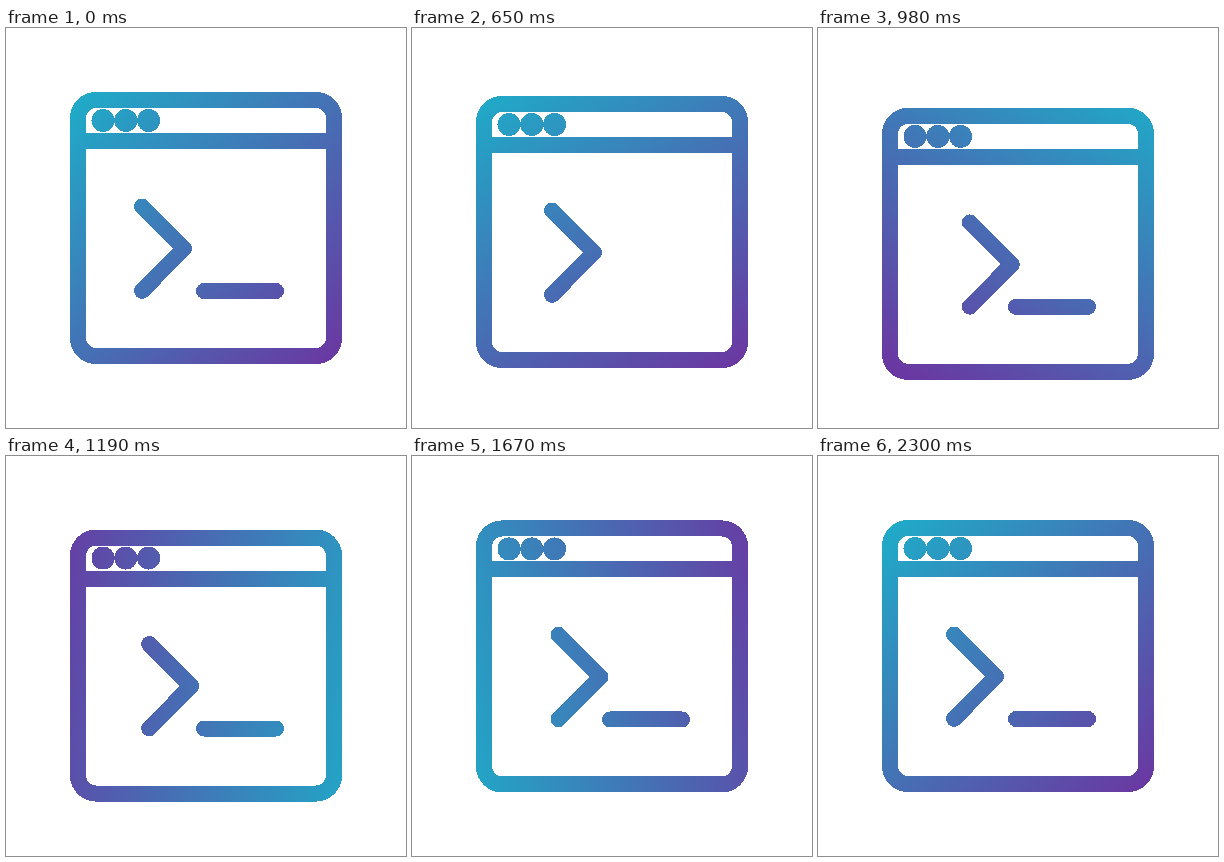
These frames come from a looping animation (400x400 px, 2.36 s). An HTML page:

```html
<!DOCTYPE html>
<html lang="en">
<head>
<meta charset="utf-8">
<title>Terminal window</title>
<style>
  html, body { margin: 0; width: 100%; height: 100%; overflow: hidden; background: #fff; }
  svg { display: block; width: 100vw; height: 100vh; }
  .ink { fill: none; stroke: #fff; stroke-width: 16; stroke-linecap: round; stroke-linejoin: round; shape-rendering: crispEdges; }
  .dots { fill: #fff; stroke: none; }
</style>
</head>
<body>
<svg viewBox="0 0 400 400">
  <defs>
    <linearGradient id="tint" gradientUnits="userSpaceOnUse" x1="16" y1="200" x2="384" y2="200">
      <stop offset="0" stop-color="#1fabc8"/>
      <stop offset="1" stop-color="#6a38a2"/>
    </linearGradient>
    <mask id="icon" maskUnits="userSpaceOnUse" x="0" y="0" width="400" height="400">
      <g id="win" class="ink">
        <rect x="72" y="72" width="256" height="256" rx="18"/>
        <path d="M72 113H328"/>
        <g class="dots">
          <circle cx="97" cy="92.5" r="11.5"/>
          <circle cx="119.8" cy="92.5" r="11.5"/>
          <circle cx="142.6" cy="92.5" r="11.5"/>
        </g>
        <path id="prompt" d="M136 178.5L178 220.5L136 262.8"/>
        <path id="cursor" d="M198 263H270"/>
      </g>
    </mask>
  </defs>
  <rect width="400" height="400" fill="url(#tint)" mask="url(#icon)"/>
</svg>
<script>
  const LOOP = 2360, START = 500, STEP = 30, RUN = 1800;
  const SHIFT = 16, PEAK = 450;
  const [tint, win, prompt, cursor] =
    ['tint', 'win', 'prompt', 'cursor'].map(id => document.getElementById(id));

  const clamp = v => Math.min(1, Math.max(0, v));
  const sine = p => (1 - Math.cos(Math.PI * p)) / 2;

  // Cubic bezier easing with flat ends: (x1, 0, x2, 1)
  const bezier = (x1, x2) => p => {
    let lo = 0, hi = 1;
    for (let i = 0; i < 24; i++) {
      const s = (lo + hi) / 2, r = 1 - s;
      if (3 * r * r * s * x1 + 3 * r * s * s * x2 + s ** 3 < p) lo = s;
      else hi = s;
    }
    return lo * lo * (3 - 2 * lo);
  };
  const settle = bezier(0.25, 0.25);
  const turn = bezier(0.34, 0.64);

  function draw(now) {
    const t = now % LOOP - START;
    const time = Math.min(RUN, Math.max(0, Math.floor(t / STEP) * STEP));

    const x = SHIFT * sine(time / PEAK);
    const y = SHIFT * (time < PEAK ? sine(time / PEAK) : 1 - settle(clamp((time - PEAK) / 900)));
    const angle = 45 + 360 * turn(clamp(time / 1600));
    const blink = time % 600;

    win.setAttribute('transform', `translate(0 ${y.toFixed(2)})`);
    prompt.setAttribute('transform', `translate(${x.toFixed(2)} 0)`);
    tint.setAttribute('gradientTransform', `rotate(${angle.toFixed(2)} 200 200)`);
    cursor.setAttribute('visibility', blink >= 150 && blink < 400 ? 'hidden' : 'visible');
  }

  const begin = performance.now();
  function tick() {
    draw(performance.now() - begin);
    requestAnimationFrame(tick);
  }
  tick();
</script>
</body>
</html>
```
